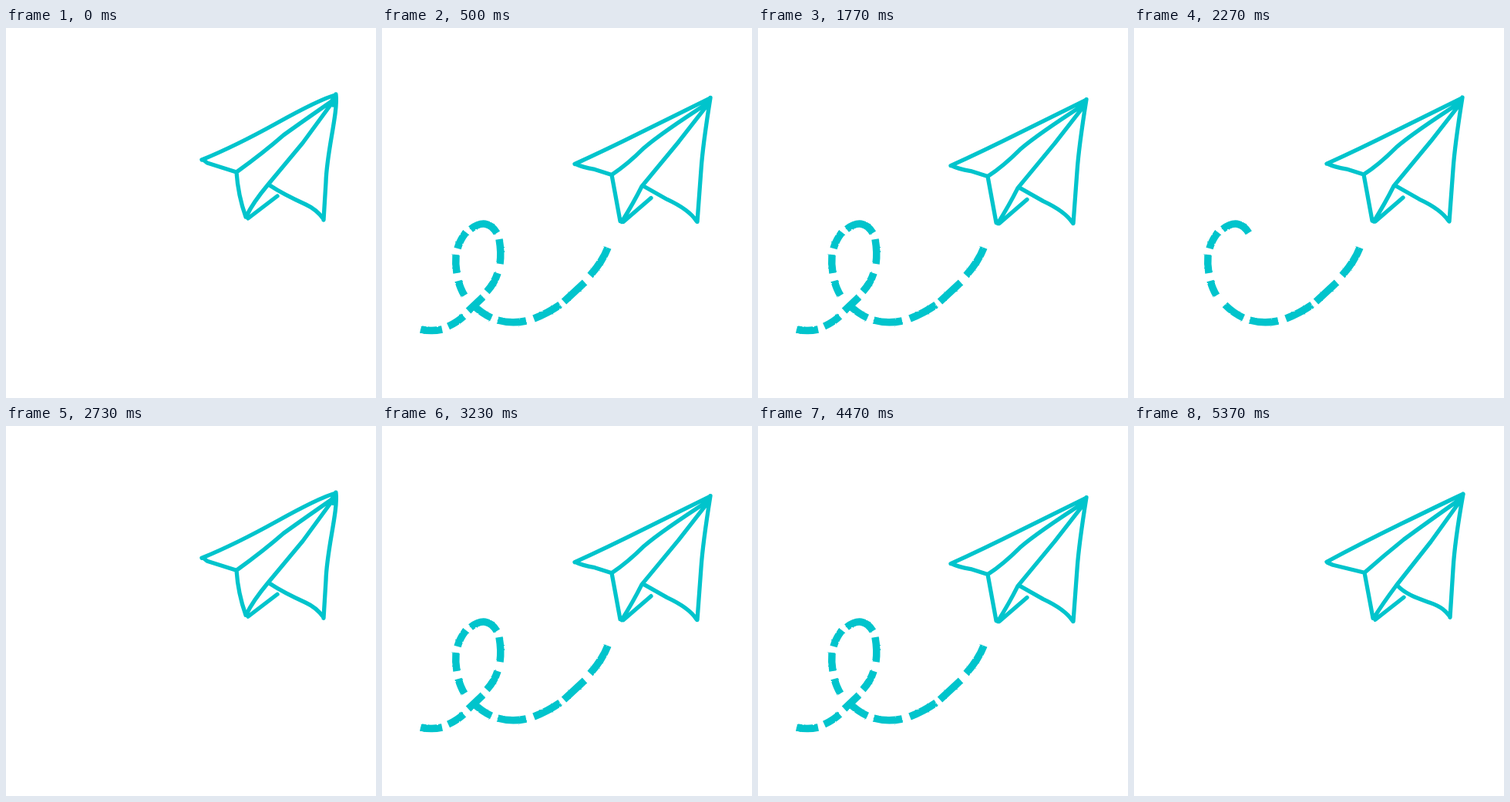
Recreate the animation shown at these times as an HTML page. Size 480 by 480 pixels, loop 5410 ms.

```html
<!DOCTYPE html>
<html lang="en">
<head>
<meta charset="utf-8">
<title>Paper plane</title>
<style>
  html, body { margin: 0; width: 100%; height: 100%; overflow: hidden; background: #fff; }
  svg { display: block; width: 100vw; height: 100vh; }
  path { fill: none; stroke: #00c4cc; }
  #plane { stroke-width: 5.3; stroke-linecap: round; stroke-linejoin: round; }
  #trail path { stroke-width: 9.5; }
</style>
</head>
<body>
<svg viewBox="0 0 480 480">
  <filter id="rough" filterUnits="userSpaceOnUse" x="0" y="0" width="480" height="480" color-interpolation-filters="sRGB">
    <feTurbulence type="fractalNoise" baseFrequency="0.3" numOctaves="2" seed="4"/>
    <feDisplacementMap in="SourceGraphic" scale="2" xChannelSelector="R" yChannelSelector="G"/>
  </filter>
  <g id="trail" filter="url(#rough)"></g>
  <path id="plane"/>
</svg>
<script>
const LOOP = 5410, STEP = 100 / 3, FRAMES = 81, CYCLE = 41, HOLD = 4.5;
const plane = document.getElementById('plane');
const trail = document.getElementById('trail');

// Hand-drawn variations of the plane, stroke by stroke.
const poses = [
  `M254 171Q298 153 352 123T427 87M256 171L261 175 299 187Q335 161 360 139Q385 121 424 94
   M299 187Q301 217 311 245M312 244Q320 227 340 203L385 149 426 93M314 247L352 218
   M342 204C357 214 378 224 389 229S407 241 412 248
   M428 86C431 110 416 160 415 200L412 249M420 98L428 87 424 100`,
  `M250 176Q293 153 346 127T427 88M251 177L258 180 299 190Q325 167 350 147Q380 125 424 94
   M299 190L310 249M311 249Q322 231 340 207L385 150 426 93M313 251L350 222
   M341 206C352 218 367 223 384 229S405 241 410 247
   M427 88Q416 150 414 185L410 248M420 98L427 88 424 100`,
  `M254 173Q288 162 340 133L426 88M254 173L261 177 298 189Q330 169 352 151Q380 126 424 94
   M298 189Q300 218 309 252M311 252Q320 230 339 206Q378 168 396 140L425 94M313 253L350 221
   M341 205L366 219Q400 232 410 250
   M427 87C428 120 420 152 413 175Q408 195 410 251M419 98L426 88 423 100`,
  `M250 173Q290 155 340 130L425 88M251 173Q259 177 276 180L298 187Q318 174 340 152Q362 133 424 93
   M298 187L309 247M311 248Q326 224 337 202L385 144 424 94M313 248L349 217
   M340 202L370 219Q398 232 408 247
   M426 87Q416 150 414 180L409 248M419 98L425 88 422 100`
];

const loopDashes = [
  'M50 391Q64 394 78 391', 'M86 387Q97 382 106 374', 'M112 367L131 349',
  'M136 342Q146 331 150 318', 'M153 306Q155 291 152 274',
  'M149 266Q136 245 115 261', 'M109 265Q101 275 98 286',
  'M96 294Q95 306 97 318', 'M99 328Q102 339 107 347'
];
const arcs = [
  ['M118 359Q129 371 142 376', 'M151 381Q170 386 189 383', 'M201 380Q217 374 232 362',
   'M237 357L264 328', 'M270 320Q288 303 293 282'],
  ['M118 359Q129 370 142 376', 'M150 379Q168 384 187 380', 'M197 377Q215 370 231 359',
   'M236 355L263 330', 'M270 321Q286 303 293 285']
];

function addDash(group, d) {
  const path = document.createElementNS('http://www.w3.org/2000/svg', 'path');
  path.setAttribute('d', d);
  group.append(path);
  return path;
}

// Measures the dashes and the gaps between them along the whole trail.
function buildTrail(arc) {
  const group = document.createElementNS('http://www.w3.org/2000/svg', 'g');
  trail.append(group);
  let total = 0, last = null;
  const dashes = [...loopDashes, ...arc].map(d => {
    const path = addDash(group, d), length = path.getTotalLength();
    const first = path.getPointAtLength(0);
    if (last) total += Math.hypot(first.x - last.x, first.y - last.y);
    const start = total;
    total += length;
    last = path.getPointAtLength(length);
    return { path, start, length };
  });
  return { group, dashes, total };
}
const trails = arcs.map(buildTrail);

const clamp = (v, lo, hi) => Math.min(hi, Math.max(lo, v));
const progress = (v, from, to) => clamp((v - from) / (to - from), 0, 1);

function showTrail({ dashes, total }, from, to) {
  for (const { path, start, length } of dashes) {
    const a = clamp(from * total - start, 0, length);
    const b = clamp(to * total - start, 0, length);
    path.style.display = b > a ? '' : 'none';
    path.setAttribute('stroke-dasharray', `0 ${a} ${b - a} ${length + 9}`);
  }
}

function render(time) {
  const frame = Math.min(2 * FRAMES - 1, Math.floor((time % LOOP + 4) / STEP)) % FRAMES;
  const pose = Math.floor(frame / HOLD) % poses.length;
  const lift = Math.sin(Math.PI * frame / FRAMES);
  plane.setAttribute('d', poses[pose]);
  plane.setAttribute('transform', `translate(0 ${6.3 * lift})`);

  const variant = pose % 2;
  const beat = frame % CYCLE;
  trails.forEach((t, i) => t.group.style.display = i === variant ? '' : 'none');
  showTrail(trails[variant], progress(beat, 21, 39), progress(beat, 1, 12));
}

const begin = performance.now();
function tick() {
  render(performance.now() - begin);
  requestAnimationFrame(tick);
}
tick();
</script>
</body>
</html>
```
